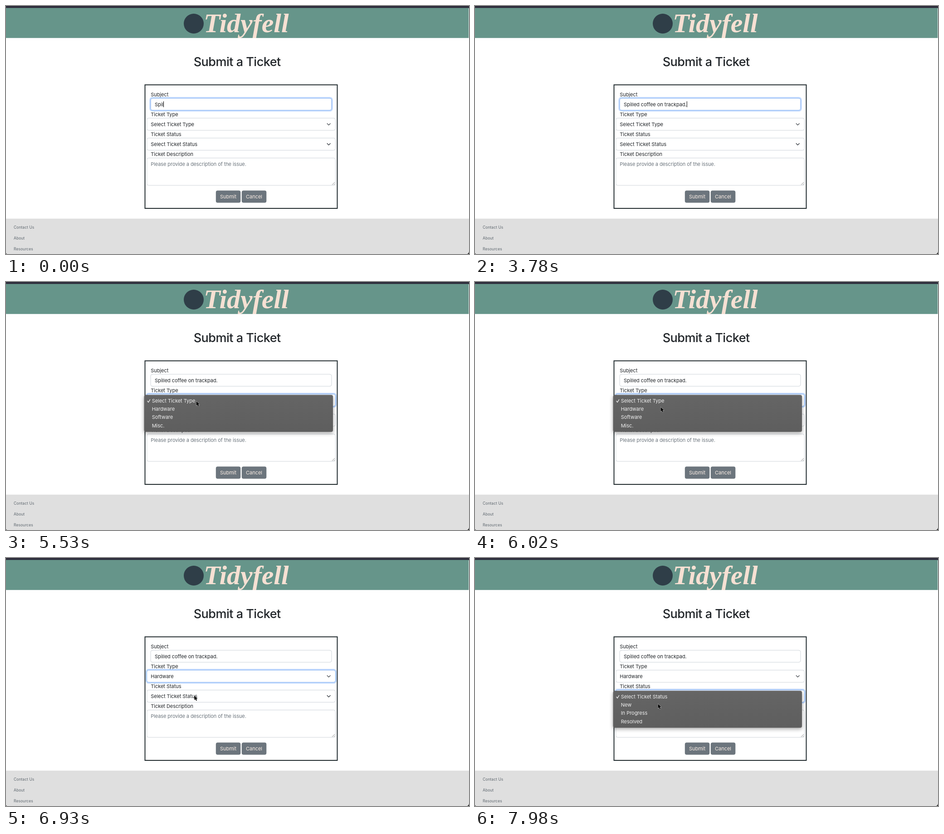
An HTML page that plays this animation: 1021 by 549 pixels, repeating every 8000 ms.

```html
<!DOCTYPE html>
<html lang="en">
<head>
<meta charset="utf-8">
<title>Submit a Ticket</title>
<style>
  html, body { margin: 0; height: 100%; overflow: hidden; background: #fff; }
  svg { display: block; width: 100vw; height: 100vh; }
  text {
    font: 11px Inter, "Liberation Sans", sans-serif; font-optical-sizing: none;
    letter-spacing: -.03px; fill: #212529; white-space: pre;
  }
  .brand { font: italic bold 60px "Liberation Serif", serif; letter-spacing: 0; fill: #f6e0d3; }
  .title { font-size: 27px; font-weight: 500; letter-spacing: -.5px; text-anchor: middle; }
  .hint { fill: #6c757d; letter-spacing: -.09px; }
  .btn { fill: #fbeee5; text-anchor: middle; }
  .foot { font-size: 8.4px; letter-spacing: .12px; fill: #5d666e; }
  .field { fill: #fff; stroke: #ced4da; }
  .line { fill: none; stroke: #343a40; stroke-width: 1.3; stroke-linecap: round; stroke-linejoin: round; }
  .menu { filter: drop-shadow(0 3px 4px rgba(0, 0, 0, .35)); }
  .menu text { fill: #f0f0f0; }
  .menu .line { stroke: #f0f0f0; }
</style>
</head>
<body>
<svg id="stage" viewBox="0 0 1021 549" preserveAspectRatio="none">
  <defs>
    <linearGradient id="shade" x2="0" y2="1">
      <stop stop-color="#656565"/><stop offset="1" stop-color="#5e5e5e"/>
    </linearGradient>
  </defs>
  <rect width="1021" height="5" fill="#2e2d3b"/>
  <rect y="4.3" width="1020.3" height="66.5" fill="#66958a"/>
  <circle cx="414" cy="39" r="22" fill="#2f3e48"/>
  <text class="brand" x="436" y="58">Tidyfell</text>
  <text class="title" x="509.7" y="132.5">Submit a Ticket</text>
  <rect x="306.5" y="174.5" width="424" height="273.5" fill="#fff" stroke="#212b2e" stroke-width="2"/>
  <rect y="470.7" width="1021" height="78.3" fill="#dfdfdf"/>
  <path d="M0 546v3h3q-3 0-3-3M1021 543v6h-6q6 0 6-6" fill="#111"/>
</svg>
<script>
const LOOP = 8000, STEP = 70;
const stage = document.getElementById("stage");

function add(tag, attrs, parent = stage) {
  const el = document.createElementNS("http://www.w3.org/2000/svg", tag);
  for (const key in attrs) el.setAttribute(key, attrs[key]);
  return parent.appendChild(el);
}
function label(x, y, str, cls = "", parent = stage) {
  const el = add("text", { x, y, class: cls }, parent);
  el.textContent = str;
  return el;
}
function field(x, y, width, height) {
  add("rect", { x, y, width, height, rx: 4, class: "field" });
}
function focusRing(x, y, width, height) {
  const ring = add("g", { fill: "none" });
  add("rect", { x: x - 1.6, y: y - 1.6, width: width + 3.2, height: height + 3.2, rx: 5.2,
    stroke: "#0d6efd", "stroke-opacity": .25, "stroke-width": 2.2 }, ring);
  add("rect", { x, y, width, height, rx: 4, stroke: "#86b7fe" }, ring);
  return ring;
}
function select(y, str) {
  const box = [310.5, y, 416, 27];
  field(...box);
  const ring = focusRing(...box);
  add("path", { d: `M708.2 ${y + 11.9}l3.5 3.5 3.5-3.5`, class: "line" });
  return { ring, value: label(319.3, y + 17.5, str) };
}
function menu(y, items) {
  const g = add("g", { class: "menu" });
  add("rect", { x: 304.5, y, width: 416.5, height: 81.7, rx: 4, fill: "url(#shade)" }, g);
  add("path", { d: `M312 ${y + 13.5}l2 2.8 3.6-6`, class: "line" }, g);
  items.forEach((item, i) => label(321.7, y + 16.6 + i * 18.4, item, "", g));
  return g;
}
function button(x, str) {
  add("rect", { x, y: 408.5, width: 54.5, height: 27, rx: 4, fill: "#6c757d" });
  label(x + 27.2, 426.3, str, "btn");
}

["Subject", "Ticket Type", "Ticket Status", "Ticket Description"]
  .forEach((str, i) => label(319.2, 199.7 + i * 44, str));
["Contact Us", "About", "Resources"].forEach((str, i) => label(17, 493 + i * 24.1, str, "foot"));

const subjectBox = [319, 204.2, 399, 26.6];
field(...subjectBox);
const subjectRing = focusRing(...subjectBox);
const subject = label(328, 221.6, "");
const caret = add("rect", { y: 211, width: 1, height: 13 });
const type = select(248.2, "Select Ticket Type");
const status = select(292.3, "Select Ticket Status");
field(310.5, 336.5, 416, 60.5);
label(319.3, 353.8, "Please provide a description of the issue.", "hint");
add("path", { d: "M719 396l6-6M722.5 396l2.5-2.5", stroke: "#777", "stroke-width": .8 });
button(462.8, "Submit");
button(519.8, "Cancel");
const typeMenu = menu(250, ["Select Ticket Type", "Hardware", "Software", "Misc."]);
const statusMenu = menu(294, ["Select Ticket Status", "New", "In Progress", "Resolved"]);
const pointer = add("path", { d: "M0 0v9.8l2.3-2.1 1.6 3.7 1.8-.8-1.6-3.6h3.1z",
  fill: "#000", stroke: "#fff", "stroke-width": .8, "paint-order": "stroke" });

const phrase = "Spilled coffee on trackpad.";
// Times at which each character after "Spil" is typed
const keys = [70, 140, 350, 560, 1050, 1260, 1400, 1540, 1610, 1820, 1890, 2030, 2170, 2240,
  2450, 2590, 2660, 2940, 3010, 3150, 3290, 3500, 3640];
// Pointer moves: start, end, x, y
const moves = [[4690, 4970, 420.5, 263], [5460, 5880, 409.5, 277],
  [6510, 6930, 415.3, 304.7], [7420, 7980, 403.5, 323]];

const ramp = (t, a, b) => Math.min(1, Math.max(0, (t - a) / (b - a)));
const ease = p => p * p * (3 - 2 * p);
const fade = (el, v) => el.setAttribute("opacity", v);

function draw(time) {
  const t = Math.floor(time % LOOP / STEP) * STEP;

  subject.textContent = phrase.slice(0, 4 + keys.filter(k => k <= t).length);
  caret.setAttribute("x", 328 + subject.getComputedTextLength());
  fade(caret, t < 4200 && !(t >= 910 && t < 1050) ? 1 : 0);

  const toType = ramp(t, 4130, 4410), toStatus = ramp(t, 7070, 7280);
  fade(subjectRing, 1 - toType);
  fade(type.ring, toType * (1 - toStatus));
  fade(status.ring, toStatus);

  type.value.textContent = t < 6090 ? "Select Ticket Type" : "Hardware";
  fade(typeMenu, t < 5250 ? 0 : 1 - ramp(t, 6090, 6370));
  fade(statusMenu, t < 7140 ? 0 : 1);

  let x = 361, y = 257;
  for (const [from, to, nx, ny] of moves) {
    const p = ease(ramp(t, from, to));
    x += (nx - x) * p;
    y += (ny - y) * p;
  }
  pointer.setAttribute("transform", `translate(${x} ${y})`);
  fade(pointer, t < 4690 ? 0 : 1);
}

const start = performance.now();
function tick() {
  draw(performance.now() - start);
  requestAnimationFrame(tick);
}
tick();
</script>
</body>
</html>
```
